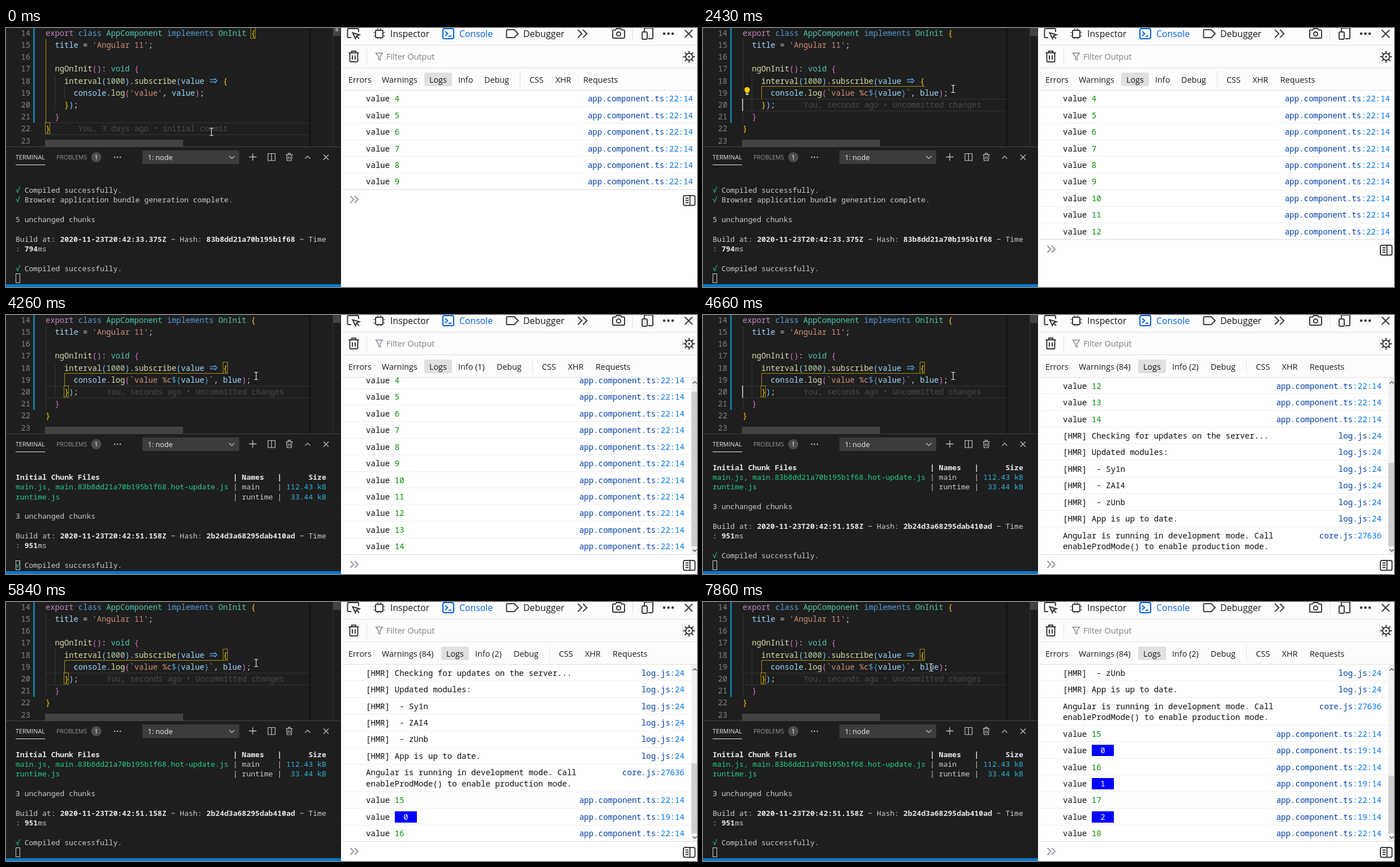
Animation of 1221x459 px, one loop 8 s. Source, as an HTML page with a canvas:

```html
<!DOCTYPE html>
<html lang="en">
<head>
<meta charset="utf-8">
<title>Console logging demo</title>
<style>
html, body { margin: 0; width: 100%; height: 100%; overflow: hidden; background: #fff; }
canvas { display: block; width: 1221px; height: 459px; }
</style>
</head>
<body>
<canvas id="stage"></canvas>
<script>
const W = 1221, H = 459, LOOP = 8000;
const SPLIT = 592; // editor on the left, developer tools on the right
const canvas = document.getElementById('stage');
const ctx = canvas.getContext('2d');
const dpr = window.devicePixelRatio || 1;
canvas.width = W * dpr;
canvas.height = H * dpr;

const MONO = '"Noto Sans Mono", "DejaVu Sans Mono", monospace';
const SANS = '"Open Sans", "Noto Sans", sans-serif';
const C = {
  key: '#c586c0', blue: '#569cd6', type: '#4ec9b0', fn: '#dcdcaa', str: '#ce9178',
  num: '#b5cea8', name: '#9cdcfe', text: '#d4d4d4',
  gold: '#ffd700', pink: '#da70d6', sky: '#87cefa', guide: '#a8900f',
  green: '#23d18b', cyan: '#29b8db', term: '#cccccc', icon: '#38383d', accent: '#0060df'
};

// ---- drawing helpers ----
function rect(x, y, w, h, color) {
  ctx.fillStyle = color;
  ctx.fillRect(x, y, w, h);
}
function frame(x, y, w, h, color) {
  ctx.strokeStyle = color;
  ctx.lineWidth = 1;
  ctx.strokeRect(x + .5, y + .5, w - 1, h - 1);
}
function text(str, x, y, size, color, family = SANS, weight = 400) {
  ctx.font = `${weight} ${size}px ${family}`;
  ctx.fillStyle = color;
  ctx.fillText(str, x, y);
}
function stroke(d, color, width = 1.5) {
  ctx.strokeStyle = color;
  ctx.lineWidth = width;
  ctx.stroke(new Path2D(d));
}
function dot(x, y, r, color) {
  ctx.fillStyle = color;
  ctx.beginPath();
  ctx.arc(x, y, r, 0, 7);
  ctx.fill();
}
function box(x, y, w, h, r, color, width, fill) {
  ctx.beginPath();
  ctx.roundRect(x, y, w, h, r);
  if (fill) { ctx.fillStyle = color; ctx.fill(); return; }
  ctx.strokeStyle = color;
  ctx.lineWidth = width;
  ctx.stroke();
}
function clipped(x, y, w, h, draw) {
  ctx.save();
  ctx.beginPath();
  ctx.rect(x, y, w, h);
  ctx.clip();
  draw();
  ctx.restore();
}
const between = (t, a, b) => t >= a && t < b;
const latest = (steps, t) => steps.filter(s => s[0] <= t).pop();

// ---- timeline ----
const CLICK = 920, PASTE = 1890, BOXED = 2500;
const MOUSE = [
  [0, 363, 184], [600, 376, 172], [680, 404, 145], [760, 431, 119], [840, 442, 108],
  [6760, 429, 109], [7070, 428, 110], [7560, 421, 112], [7640, 410, 115], [7720, 403, 116]
];
// toggles between hidden and visible, hidden first
const CARET = [70, 600, CLICK, 1480, PASTE, 2880, 3350, 3880, 4340, 4800, 5350, 5840, 6310, 6850, 7310, 7860];

const LOGS = [];
const addLog = (at, body, src, kind) => LOGS.push({ at, body, src, kind });
const addValue = (at, n) => addLog(at, n, 'app.component.ts:22:14', 'value');
const addBadge = (at, n) => addLog(at, n, 'app.component.ts:19:14', 'badge');
for (let n = 4; n < 10; n++) addValue(0, n);
[600, 840, 1790, 2800, 3800].forEach((at, i) => addValue(at, 10 + i));
['Checking for updates on the server...', 'Updated modules:', ' - Sy1n', ' - ZAI4', ' - zUnb', 'App is up to date.']
  .forEach((s, i) => addLog(i ? 4660 : 4490, ['[HMR] ' + s], 'log.js:24'));
addLog(4660, ['Angular is running in development mode. Call', 'enableProdMode() to enable production mode.'], 'core.js:27636');
addValue(4800, 15);
addBadge(5590, 0);
addValue(5840, 16);
addBadge(6620, 1);
addValue(6850, 17);
addBadge(7560, 2);
addValue(7860, 18);

// ---- editor ----
const CH = 8.25, LEFT = 70;
const lineY = n => 136 + (n - 20) * 21.17;
const colX = col => LEFT + col * CH;

const LINES = {
  14: [0, 'export ', 'key', 'class ', 'blue', 'AppComponent ', 'type', 'implements ', 'blue', 'OnInit ', 'type', '{', 'gold'],
  15: [2, 'title', 'name', ' = ', 'text', "'Angular 11'", 'str', ';', 'text'],
  17: [2, 'ngOnInit', 'fn', '()', 'pink', ': ', 'text', 'void ', 'type', '{', 'pink'],
  18: [4, 'interval', 'fn', '(', 'sky', '1000', 'num', ')', 'sky', '.', 'text', 'subscribe', 'fn', '(', 'sky', 'value', 'name', '    ', 'text', '{', 'gold'],
  20: [4, '}', 'gold', ')', 'sky', ';', 'text'],
  21: [2, '}', 'pink'],
  22: [0, '}', 'gold']
};
const LOG_HEAD = [6, 'console', 'name', '.', 'text', 'log', 'fn', '(', 'pink'];
const OLD_LOG = [...LOG_HEAD, "'value'", 'str', ', ', 'text', 'value', 'name', ')', 'pink', ';', 'text'];
const NEW_LOG = [...LOG_HEAD, '`value %c', 'str', '${', 'blue', 'value', 'name', '}', 'blue', '`', 'str', ', ', 'text', 'blue', 'name', ')', 'pink', ';', 'text'];

const code = (s, x, n, color) => text(s, x, lineY(n) + 5, 13.75, color, MONO, 500);
function codeLine(n, [col, ...runs]) {
  for (let i = 0; i < runs.length; i += 2) {
    code(runs[i], colX(col), n, C[runs[i + 1]]);
    col += runs[i].length;
  }
}
const blame = (n, x, msg) => code('You, ' + msg, x, n, '#4b4b4b');

function bracketBox(n, col) {
  frame(Math.round(colX(col)) - 1, Math.round(lineY(n)) - 11, 9, 21, C.guide);
}
function bulb() {
  dot(78, 109.5, 4.8, '#ffcc00');
  rect(75.5, 112, 5, 3, '#ffcc00');
  rect(75.5, 116, 5, 2.5, '#d7d7d7');
}

function editor(t) {
  const line = t < CLICK ? 22 : t < PASTE ? 19 : 20;
  const caretX = t < CLICK ? 77 : t < PASTE ? 350 : 69;
  const caretOn = CARET.filter(c => c <= t).length % 2 === 1;
  const y = Math.round(lineY(line));

  rect(0, 0, SPLIT, 211, '#1e1e1e');
  rect(48, 0, 3, 168, '#0c7d9d');
  rect(69, y - 11, 468, 2, '#2a2a2a');
  rect(69, y + 10, 468, 2, '#2a2a2a');

  rect(70, 20, 1, 148, t < CLICK ? C.guide : '#383838');
  rect(86, 83, 1, 63, '#383838');
  rect(103, 104, 1, 21, '#383838');
  if (t >= CLICK) {
    rect(103, 103, 289, 1, C.guide);
    rect(103, 103, 1, 23, C.guide);
  }

  for (let n = 14; n < 24; n++) code(n, 26.5, n, '#858585');
  for (const n in LINES) codeLine(+n, LINES[n]);
  codeLine(19, t < PASTE ? OLD_LOG : NEW_LOG);
  stroke('M360 91.5H371M360 95.5H371M368.5 89L373 93.5L368.5 98', C.blue, 1.3);

  clipped(0, 0, 537, 210, () => {
    if (t < CLICK) blame(22, 128, '3 days ago • initial commit');
    if (between(t, 1260, PASTE)) blame(19, 401, '3 days ago • initial commit');
    if (between(t, 2190, 2650) || t >= 3650) blame(20, 178, 'seconds ago • Uncommitted changes');
  });

  if (t < CLICK) {
    bracketBox(14, 44);
    bracketBox(22, 0);
  } else if (t < PASTE || t >= BOXED) {
    bracketBox(18, 38);
    bracketBox(20, 4);
  }
  if (between(t, 2100, BOXED)) bulb();
  if (caretOn) rect(caretX, y - 11, 2, 22, '#aeafad');

  const shade = ctx.createLinearGradient(533, 0, 539, 0);
  shade.addColorStop(0, 'rgba(0,0,0,0)');
  shade.addColorStop(1, 'rgba(0,0,0,.4)');
  ctx.fillStyle = shade;
  ctx.fillRect(533, 0, 6, 210);
  rect(577, 0, 1, 210, '#333333');
  rect(578, 0, 13, 14, '#434343');
  if (t < CLICK) rect(582, 0, 5, 6, '#8a8a8a');
  rect(69, 198, 244, 12, '#434343');
}

// ---- terminal ----
const TW = 7.84;
const rowY = r => 270 + r * 17.34;
// each run: column, text, colour, weight
const put = (r, ...runs) => runs.forEach(([col, s, color = C.term, weight = 500]) =>
  text(s, 17 + col * TW, rowY(r) + 4.7, 13.07, color, MONO, weight));
const tick = (r, s) => put(r, [0, '√', C.green], [2, s]);

function buildInfo(r, stamp, hash, ms) {
  const bold = ['#e8e8e8', 700];
  put(r, [0, 'Build at:'], [10, stamp, ...bold], [35, '−'], [37, 'Hash:'], [43, hash, ...bold], [64, '−'], [66, 'Time']);
  put(r + 1, [0, ':'], [2, ms, ...bold], [5, 'ms']);
}
function termCursor(r) {
  frame(17, Math.round(rowY(r)) - 8, 8, 17, '#d0d0d0');
}
function chunkRow(r, file, name, size, head) {
  const w = head ? 700 : 500, plain = head ? '#e8e8e8' : C.term;
  put(r, [0, file, head ? plain : C.green, w], [49, '|', plain, w], [51, name, plain, w],
    [59, '|', plain, w], [70 - size.length, size, head ? plain : C.cyan, w]);
}

function terminal(t) {
  if (t < 4030) {
    tick(1, 'Compiled successfully.');
    tick(2, 'Browser application bundle generation complete.');
    put(4, [0, '5 unchanged chunks']);
    buildInfo(6, '2020-11-23T20:42:33.375Z', '83b8dd21a70b195b1f68', '794');
    tick(9, 'Compiled successfully.');
    if (t < 3280) termCursor(10);
    else put(10, [0, '−', C.cyan], [2, 'Generating browser application bundles...']);
    return;
  }
  const top = t < 4180 ? 2 : t < 4340 ? 1 : 0;
  if (top === 2) tick(0, 'Browser application bundle generation complete.');
  chunkRow(top, 'Initial Chunk Files', 'Names', 'Size', true);
  chunkRow(top + 1, 'main.js, main.83b8dd21a70b195b1f68.hot-update.js', 'main', '112.43 kB');
  chunkRow(top + 2, 'runtime.js', 'runtime', '33.44 kB');
  put(top + 4, [0, '3 unchanged chunks']);
  buildInfo(top + 6, '2020-11-23T20:42:51.158Z', '2b24d3a68295dab410ad', '951');
  if (top < 2) tick(top + 9, 'Compiled successfully.');
  termCursor(10);
}

function panel(t) {
  rect(0, 210, SPLIT, 249, '#1e1e1e');
  rect(0, 210, SPLIT, 1, '#454545');
  text('TERMINAL', 17, 233, 10.75, '#e7e7e7');
  rect(17, 242, 52, 1, '#e7e7e7');
  text('PROBLEMS', 89, 233, 10.5, '#989898');
  dot(159.5, 229, 9, '#4d4d4d');
  text('1', 156.5, 233, 10.5, '#ffffff');
  [192, 197, 202].forEach(x => dot(x, 229, 1.2, '#c5c5c5'));
  rect(241, 217, 171, 24, '#3c3c3c');
  text('1: node', 250.5, 234.3, 12.6, '#f0f0f0');
  const ic = '#c5c5c5';
  stroke('M394.5 227L399 231.5L403.5 227', ic, 1.2);
  stroke('M429.5 228.5H442.5M436 222V235', ic, 1.3);
  stroke('M463 222.5H475.5V235H463ZM469.2 222.5V235', ic, 1.2);
  stroke('M494.5 224.5H506.5M498.5 224V222.2H502.5V224M496 225L496.6 235H504.4L505 225M499 227.5V232.5M502 227.5V232.5', ic, 1.2);
  stroke('M528.5 231.5L533 227L537.5 231.5', ic, 1.2);
  stroke('M561 224.5L570 233.5M570 224.5L561 233.5', ic, 1.2);
  terminal(t);
  rect(0, 454, SPLIT, 5, '#007acc');
}

// ---- developer tools ----
function toolbar(t) {
  const ic = C.icon, line = '#e0e0e2';
  rect(SPLIT, 0, W - SPLIT, 111, '#fdfdfe');
  rect(594, 30, 627, 1, line);
  rect(594, 70, 627, 1, line);

  stroke('M610 17H605Q603.5 17 603.5 15V3Q603.5 1 605.5 1H621Q623 1 623 3V7', ic, 2);
  stroke('M612.5 8.5L624.5 12L619.5 14L617.5 19ZM619 14L624 19', ic, 2);
  box(653, 4, 13, 13, 2, ic, 2);
  stroke('M649 8H653M649 14H653M666 8H670M666 14H670M657 0V4M662 0V4M657 17V20M662 17V20', ic, 1.2);
  text('Inspector', 679, 16, 15.8, '#18181a');
  box(772, 1, 19, 18, 3, C.accent, 2);
  stroke('M776 6L780.5 10L776 14M782 14.5H787', C.accent, 1.8);
  text('Console', 801, 16, 15.8, C.accent);
  stroke('M886 3H898L905 10L898 17H886Q884.5 17 884.5 15.5V4.5Q884.5 3 886 3Z', ic, 2);
  text('Debugger', 914, 16, 15.9, '#18181a');
  stroke('M1010.5 3L1017.5 10L1010.5 17M1019.5 3L1026.5 10L1019.5 17', ic, 2);
  stroke('M1074 3.5H1077L1079 1H1086L1088 3.5H1091Q1093 3.5 1093 5.5V16Q1093 18 1091 18H1074Q1072 18 1072 16V5.5Q1072 3.5 1074 3.5Z', ic, 2);
  ctx.beginPath();
  ctx.arc(1082.5, 10.5, 3.6, 0, 7);
  ctx.stroke();
  rect(1107, 0, 1, 22, line);
  stroke('M1128 6V2Q1128 0 1130 0H1141Q1143 0 1143 2V17Q1143 19 1141 19H1135', ic, 2);
  box(1124, 7, 9, 13, 2, ic, 2);
  [1163, 1170.5, 1178].forEach(x => dot(x, 10, 2.3, ic));
  stroke('M1199.5 3.5L1213 17M1213 3.5L1199.5 17', ic, 2);

  stroke('M605.5 44H623.5M611 43.5V41H618V43.5M607.5 44.5V58Q607.5 60 609.5 60H619.5Q621.5 60 621.5 58V44.5M612 48.5V56M617 48.5V56', ic, 2);
  rect(637, 37, 1, 28, line);
  stroke('M653.5 44.5H665.5L661 50.5V57L658 55V50.5Z', '#85858f', 1.4);
  text('Filter Output', 672, 56.2, 14.4, '#7c7c84');
  rect(1195, 37, 1, 28, line);
  gear(1207, 51);

  const warned = t >= 4490;
  const a = warned ? 30 : 0, b = a + (t >= 3200 ? 22 : 0);
  const info = t < 3200 ? 'Info' : t < 4660 ? 'Info (1)' : 'Info (2)';
  box(739 + a, 79, 49, 24, 3, '#e0e0e1', 0, true);
  [['Errors', 605], [warned ? 'Warnings (84)' : 'Warnings', 664], ['Logs', 748 + a], [info, 799 + a],
    ['Debug', 845 + b], ['CSS', 925 + b], ['XHR', 971 + b], ['Requests', 1020 + b]]
    .forEach(([s, x]) => text(s, x, 96.8, 14.35, '#18181a'));
  rect(908 + b, 77, 1, 28, line);
  rect(594, 110, 627, 1, line);
}

function gear(x, y) {
  ctx.strokeStyle = C.icon;
  ctx.lineWidth = 2;
  ctx.beginPath();
  ctx.arc(x, y, 6, 0, 7);
  for (let i = 0; i < 8; i++) {
    const c = Math.cos(i * Math.PI / 4), s = Math.sin(i * Math.PI / 4);
    ctx.moveTo(x + 6 * c, y + 6 * s);
    ctx.lineTo(x + 10.5 * c, y + 10.5 * s);
  }
  ctx.stroke();
  dot(x, y, 1.8, C.icon);
}

const CW = 8.46, ROW = 29.44, TOP = 110.5, FLOOR = 425;
const rowHeight = log => log.kind ? ROW : ROW + (log.body.length - 1) * 19.6;
const mono = (s, x, y, color) => text(s, x, y + 5, 14.1, color, MONO);

function logRow(log, top, right) {
  const y = top + ROW / 2;
  if (log.kind) {
    mono('value', 636, y, '#0c0c0d');
    if (log.kind === 'badge') {
      rect(687, Math.round(y) - 10, 39, 20, '#0000ff');
      mono(log.body, 702.3, y, '#ffffff');
    } else mono(log.body, 636 + 6 * CW, y, '#058b00');
  } else log.body.forEach((s, i) => mono(s, 636, y + i * 19.6, '#0c0c0d'));

  const cut = log.src.indexOf(':');
  const x = right - log.src.length * CW;
  mono(log.src.slice(0, cut), x, y, '#003eaa');
  mono(log.src.slice(cut), x + cut * CW, y, '#0074e8');
}

function sidebarIcon() {
  box(1197, 10, 20.5, 17.5, 3, C.icon, 2);
  stroke('M1208.5 10V27.5', C.icon, 2);
  stroke('M1200.5 14.5H1206M1200.5 18.5H1206M1200.5 22.5H1206', C.icon, 1.8);
}

function consoleView(t) {
  const logs = LOGS.filter(l => l.at <= t);
  const total = logs.reduce((sum, l) => sum + rowHeight(l), 0);
  const bottom = Math.min(TOP + total, FLOOR);
  const scrolled = TOP + total > FLOOR;
  const edge = scrolled ? 1211 : 1221;

  rect(SPLIT, 111, W - SPLIT, 348, '#ffffff');
  clipped(SPLIT, 111, W - SPLIT, FLOOR - 111, () => {
    let y = bottom - total;
    logs.forEach(log => {
      logRow(log, y, scrolled ? 1199 : 1214);
      y += rowHeight(log);
      rect(594, Math.round(y) - 1, edge - 594, 1, '#ededf0');
    });
  });
  rect(594, Math.round(bottom) - 1, 627, 1, '#d7d7db');

  if (scrolled) {
    const thumb = 274 * Math.pow(323.8 / total, 1.165);
    rect(1211, 111, 10, 313, '#f0f0f0');
    rect(1211, Math.round(410 - thumb), 10, Math.round(thumb), '#cdcdcd');
    stroke('M1213.5 121.5L1217 118L1220.5 121.5M1213.5 415.5L1217 419L1220.5 415.5', '#505050', 1.5);
  }

  ctx.save();
  ctx.translate(0, Math.round(bottom));
  stroke('M608.5 11L614.5 17L608.5 23M616 11L622 17L616 23', '#8f8f9d', 1.8);
  sidebarIcon();
  ctx.restore();
}

function mouse(t) {
  const [, x, y] = latest(MOUSE, t);
  ctx.save();
  ctx.translate(x, y);
  const beam = 'M-3.5 -6.5H-1L0 -5.5L1 -6.5H3.5M0 -5.5V5.5M-3.5 6.5H-1L0 5.5L1 6.5H3.5';
  stroke(beam, '#111111', 2.6);
  stroke(beam, '#f2f2f2', 1.2);
  ctx.restore();
}

const start = performance.now();
function draw() {
  const t = (performance.now() - start) % LOOP;
  ctx.setTransform(dpr, 0, 0, dpr, 0, 0);
  rect(0, 0, W, H, '#ffffff');
  editor(t);
  panel(t);
  consoleView(t);
  toolbar(t);
  mouse(t);
  requestAnimationFrame(draw);
}
draw();
</script>
</body>
</html>
```
